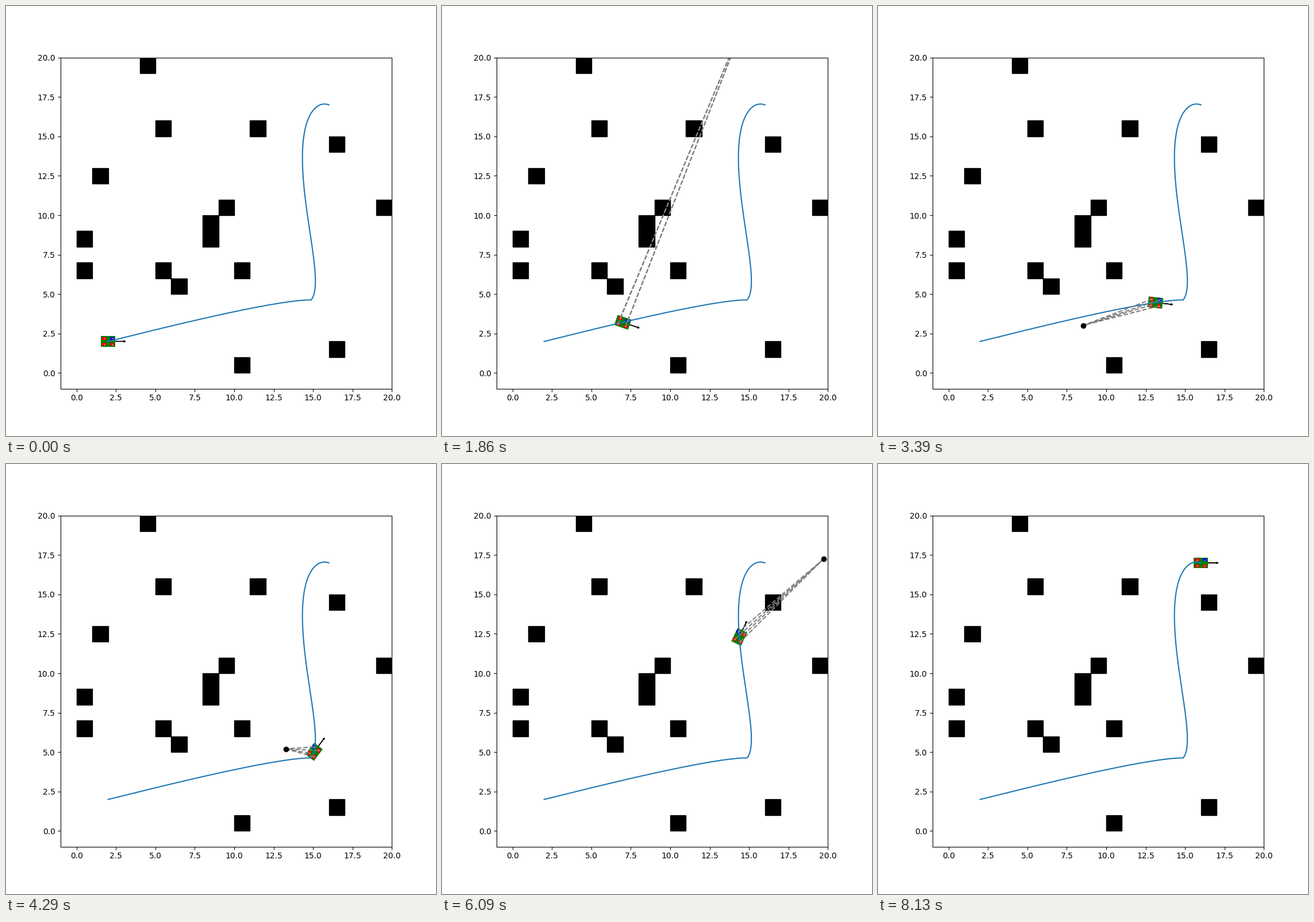
A matplotlib script for the animation above (8.16 s loop, 748 px wide and 748 px high).

```python
import numpy as np
import matplotlib.pyplot as plt
from matplotlib.animation import FuncAnimation
from matplotlib.patches import FancyArrow, Polygon, Rectangle
from numpy.polynomial import Polynomial

STAGE = 748
FRAMES, INTERVAL = 272, 30
CORNER = 135            # clock tick of the sharp turn
MAX_REACH = 60

CELLS = [(4, 19), (5, 15), (11, 15), (16, 14), (1, 12), (9, 10), (19, 10),
         (8, 9), (8, 8), (0, 8), (0, 6), (5, 6), (10, 6), (6, 5), (16, 1),
         (10, 0)]

# Key poses: clock tick, x, y, heading, bearing of the turning axis (degrees)
LEG_A = [(0, 2, 2, 0, -80), (28, 3.38, 2.338, -6, 19),
         (62, 6.993, 3.212, -19, 68), (90, 10.516, 3.99, -21.8, 55),
         (135, 14.875, 4.629, 35, -30)]
LEG_B = [(135, 14.875, 4.629, 35, -30), (142, 15.06, 5.016, 53, -6),
         (180, 14.752, 9.255, 81.5, 56.7), (228, 14.464, 15.325, 34, -1.2),
         (251, 15.168, 16.83, 10.2, -49), (270, 16, 17, 0, -92)]

WHEELS = np.array([(.25, .19), (.25, -.19), (-.25, .19), (-.25, -.19)])
BODY, TYRE = (.93, .68), (.28, .17)


def through(keys):
    """One polynomial of time per column, passing through every key pose."""
    t, *columns = np.array(keys, float).T
    return [Polynomial.fit(t, c, len(t) - 1) for c in columns]


LEGS = [through(LEG_A), through(LEG_B)]
RATES = [[p.deriv() for p in leg] for leg in LEGS]


def pose(t):
    """Centre, heading, turning axis bearing and signed turning radius."""
    k = int(t > CORNER)
    x, y, heading, bearing = (p(t) for p in LEGS[k])
    vx, vy, spin, _ = (p(t) for p in RATES[k])
    radius = np.hypot(vx, vy) / np.radians(spin)
    return (np.array([x, y]), np.radians(heading), np.radians(bearing),
            np.clip(radius, -MAX_REACH, MAX_REACH))


def rotation(a):
    return np.array([(np.cos(a), -np.sin(a)), (np.sin(a), np.cos(a))])


def box(centre, size, angle):
    w, h = size[0] / 2, size[1] / 2
    pts = np.array([(-w, -h), (w, -h), (w, h), (-w, h)])
    return centre + pts @ rotation(angle).T


fig, ax = plt.subplots(figsize=(STAGE / 100, STAGE / 100), dpi=100)
ax.set_aspect("equal")
ax.set(xlim=(-1, 20), ylim=(-1, 20))
ticks = np.arange(0, 20.1, 2.5)
ax.set_xticks(ticks)
ax.set_yticks(ticks)

for cell in CELLS:
    ax.add_patch(Rectangle(cell, 1, 1, color="black"))

clock = np.arange(0, 2 * CORNER + .1, .5)
ax.plot(*np.array([pose(t)[0] for t in clock]).T, color="tab:blue", lw=1.5)

arrow = FancyArrow(0, 0, 1, 0, width=.001, head_width=.1, head_length=.1,
                   color="black", lw=1)
ARROW = arrow.get_xy().copy()
ax.add_patch(arrow)
body = ax.add_patch(Polygon(box((0, 0), BODY, 0), color="green", lw=0))
tyres = [ax.add_patch(Polygon(box(w, TYRE, 0), color=c, lw=0))
         for w, c in zip(WHEELS, ("blue", "red", "red", "red"))]
rays = [ax.plot([], [], "--", color="gray", lw=1.5)[0] for _ in WHEELS]
hubs, = ax.plot([], [], "o", color="#ffd8c0", ms=1.3, mew=0)
pivot, = ax.plot([], [], "o", color="black", ms=6)


def draw(i):
    t = i if i <= CORNER else i - 1     # the robot rests one frame at the turn
    centre, heading, bearing, radius = pose(t)
    turning = 0 < i < FRAMES - 1
    centre_of_turn = centre - radius * np.array([np.cos(bearing),
                                                 np.sin(bearing)])
    spin = rotation(heading)
    wheels = centre + WHEELS @ spin.T

    arrow.set_xy(centre + ARROW @ spin.T)
    body.set_xy(box(centre, BODY, heading))
    for tyre, ray, w in zip(tyres, rays, wheels):
        dx, dy = centre_of_turn - w
        steer = np.arctan2(dy, dx) + np.pi / 2 if turning else heading
        tyre.set_xy(box(w, TYRE, steer))
        ray.set_data(*np.array([w, centre_of_turn]).T)
        ray.set_visible(turning)
    hubs.set_data(*wheels.T)
    pivot.set_data(*centre_of_turn[:, None])
    pivot.set_visible(turning)
    return [arrow, body, *tyres, *rays, hubs, pivot]


anim = FuncAnimation(fig, draw, frames=FRAMES, interval=INTERVAL,
                     repeat=True, repeat_delay=0, blit=False)
plt.show()
```
